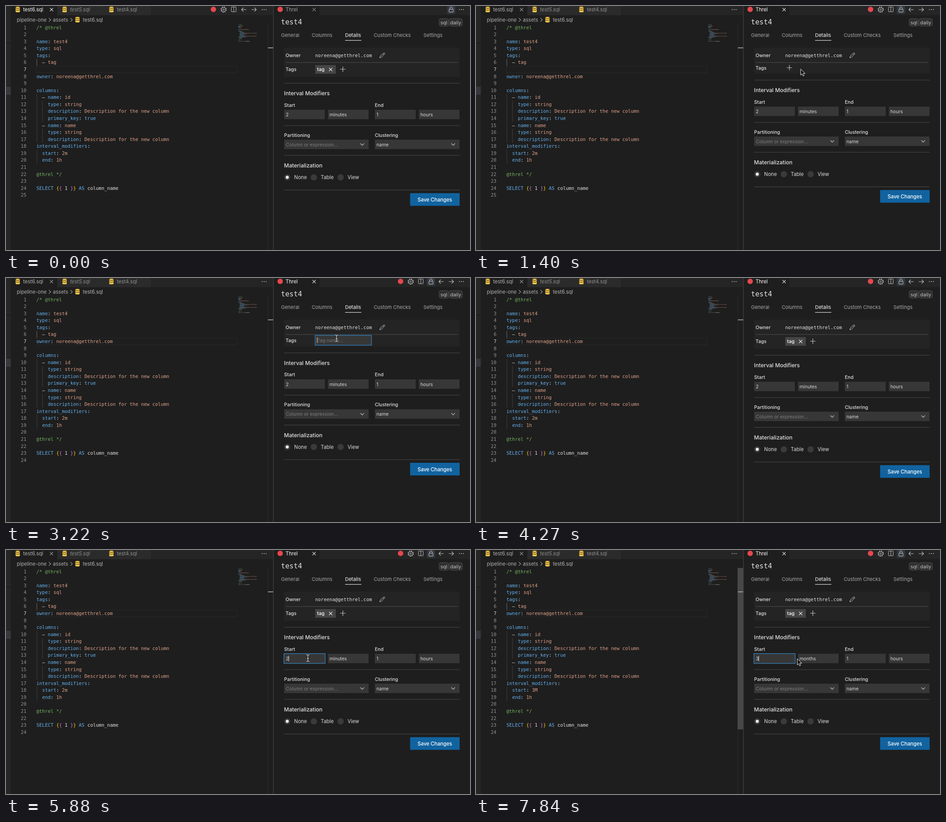
Animation of 1029x544 px, one loop 8 s. Source, as an HTML page:

```html
<!DOCTYPE html>
<html lang="en">
<head>
<meta charset="utf-8">
<title>Asset editor</title>
<style>
  html, body { margin: 0; width: 100%; height: 100%; overflow: hidden; background: #1e1e1e; }
  svg { display: block; width: 100vw; height: 100vh; }
  text { font-family: Inter, Roboto, sans-serif; white-space: pre; }
  .mono { font-family: "DejaVu Sans Mono", "Liberation Mono", monospace; }
</style>
</head>
<body>
<svg id="stage" viewBox="0 0 1029 544" preserveAspectRatio="none">
  <g id="scene"></g>
  <rect id="scroll" x="580" y="40" width="12.5" height="360" fill="#484848"/>
  <rect x="581" y="92.4" width="11.5" height="1.8" fill="#a6a6a6"/>
  <g id="mouse"></g>
</svg>
<script>
const LOOP = 8000;
const FG = '#e2e2e2', BLUE = '#64b1ee', ORANGE = '#e0a188', GREEN = '#74b563';
const GOLD = '#ffd700', PINK = '#da70d6', RED = '#e5484d';
const LINE = 15.57, CHAR = 6.267, CODE_SIZE = 10.41, CODE_X = 67.6, CODE_Y = 40.2;
const $ = id => document.getElementById(id);

// Drawing helpers
const rect = (x, y, w, h, fill, more = '') =>
  `<rect x="${x}" y="${y}" width="${w}" height="${h}" fill="${fill}" ${more}/>`;
const circle = (x, y, r, fill, more = '') => `<circle cx="${x}" cy="${y}" r="${r}" fill="${fill}" ${more}/>`;
const stroke = (d, color, w = 1, more = '') =>
  `<path d="${d}" fill="none" stroke="${color}" stroke-width="${w}" ${more}/>`;
const text = (x, y, str, size, fill, more = '') =>
  `<text x="${x}" y="${y}" font-size="${size}" fill="${fill}" ${more}>${str}</text>`;
const at = (x, y, body) => `<g transform="translate(${x} ${y})">${body}</g>`;
const MED = 'font-weight="500"';

// Icons, centred on their position
const cross = (x, y, c, r = 3.6) => at(x, y, stroke(`M${-r} ${-r}L${r} ${r}M${r} ${-r}L${-r} ${r}`, c, 1.15));
const plus = (x, y) => at(x, y, stroke('M-6 0H6M0 -6V6', '#c5c5c5', 1.2));
const dots = (x, c) => at(x, 8, [-4.3, 0, 4.3].map(d => circle(d, 0, 1, c)).join(''));
const arrow = (x, dir, c) => at(x, 8, `<g transform="scale(${dir} 1)">${stroke('M-5.5 0H5M.8 -4.3L5.1 0L.8 4.3', c, 1.15)}</g>`);
const chevron = (x, y, c, turn = 0) =>
  at(x, y, stroke('M-4 -2.1L0 2.1L4 -2.1', c, 1.15, `transform="rotate(${turn})"`));
const gear = (x, c) => at(x, 8, circle(0, 0, 5.9, 'none', `stroke="${c}" stroke-width="1.6" stroke-dasharray="2.3 2.334"`)
  + circle(0, 0, 4.8, 'none', `stroke="${c}"`) + circle(0, 0, 1.8, 'none', `stroke="${c}"`));
const split = (x, c) => at(x, 7.5, rect(-5.3, -5.3, 10.6, 10.6, 'none', `rx="1" stroke="${c}"`) + stroke('M0 -5V5', c));
const lock = x => at(x, 8, rect(-9, -8.5, 18, 18, '#343a42', 'rx="3"')
  + rect(-4.6, -.8, 9.2, 6.3, 'none', 'rx="1" stroke="#d0d0d0"') + stroke('M-2.8 -1V-3.2a2.8 2.8 0 0 1 5.6 0V-1', '#d0d0d0'));
const db = (x, y) => at(x, y, rect(-4.8, -6.3, 9.6, 12.6, '#f5c648', 'rx="4" ry="2.2"')
  + [-2.6, 1.4].map(d => stroke(`M-5 ${d - .8}Q0 ${d + 1.8} 5 ${d - .8}`, '#2a2618')).join(''));
const pencil = (x, y) => at(x, y, stroke('M-5.5 5.5L-4.6 1.8L3 -5.2Q4 -6 5.2 -4.9T5 -2.8L-2.2 4.5ZM1.5 -3.8L3.8 -1.4', '#d2d2d2'));

const POINTERS = {
  arrow: '<path d="M0 0V13.6L3.1 10.8L5.2 15.6L7.6 14.5L5.5 9.9H9.8Z" fill="#111" stroke="#eee" stroke-width="1"/>',
  beam: ['#111', '#eee'].map((c, i) =>
    stroke('M-3.6 -7.6Q-.6 -7.6 0 -6Q.6 -7.6 3.6 -7.6M0 -6V6M-2 1H2M-3.6 7.6Q-.6 7.6 0 6Q.6 7.6 3.6 7.6', c, i ? 1.2 : 2.6)).join(''),
  hand: '<path d="M-1.4 .8Q0 -.8 1.4 .8V5.4Q2.6 4.6 3.8 5.8Q5 5 6 6.4Q7.6 6 7.8 7.8V10.4Q7.4 12.4 6.2 14.6H-.2Q-2 12-3.8 9.6Q-4.4 7.8-2.8 7.8L-1.4 9Z" fill="#f4f4f4" stroke="#222" stroke-width=".8"/>'
    + stroke('M1.8 8.6V12.2M3.6 8.6V12.2M5.4 8.6V12.2', '#444', .6)
};

// time, x, y, pointer (empty = hidden)
const TRACK = [
  [0, 470, 470, ''], [350, 470, 470, 'beam'], [525, 594, 320, 'arrow'], [770, 710, 152, 'hand'],
  [840, 719, 141, 'hand'], [980, 719, 141, 'hand'], [1120, 720, 141, 'hand'], [1330, 720, 140.5, 'arrow'],
  [1540, 720, 140.5, 'arrow'], [1680, 727, 142, 'arrow'], [1840, 704, 137, 'hand'], [1930, 696.5, 135.5, 'hand'],
  [2240, 696.5, 135.5, 'beam'], [2430, 733, 134.5, 'beam'], [3570, 733, 134.5, ''], [4690, 733, 134, 'arrow'],
  [4860, 795, 185, 'arrow'], [5040, 836, 243, 'arrow'], [5180, 796, 255, 'arrow'], [5350, 707, 246, 'beam'],
  [5460, 669.5, 241, 'beam'], [6090, 669.5, 241, 'beam'], [6200, 710, 244, 'arrow'], [6300, 720, 246, ''],
  [7770, 712.5, 242.5, 'arrow'], [LOOP, 712.5, 242.5, 'arrow']
];

function codeLines(s) {
  const col = '    description: Description for the new column';
  return [
    '/* @threl', '', 'name: test4', 'type: sql', 'tags:', '  – tag', ...(s.gap ? [''] : []),
    'owner: noreena@getthrel.com', '', 'columns:',
    '  – name: id', '    type: string', col, '    primary_key: true',
    '  – name: name', '    type: string', col,
    'interval_modifiers:', ...(s.start ? ['  start: ' + s.start] : []), '  end: 1h',
    '', '@threl */', '', 'SELECT {{ 1 }} AS column_name', ''
  ];
}

function tokens(line) {
  if (/^(\/\*|@)/.test(line)) return [[line, GREEN]];
  if (line.startsWith('SELECT')) return [['SELECT ', BLUE], ['{', GOLD], ['{', PINK], [' 1 ', FG],
    ['}', PINK], ['}', GOLD], [' AS ', BLUE], ['column_name', FG]];
  const [, lead, key, colon, value] = line.match(/^( *(?:– )?)(?:(\w+)(: ?))?(.*)$/);
  return [[lead, FG], [key || '', BLUE], [colon || '', FG], [value, value === 'true' ? BLUE : ORANGE]];
}

function editor(s) {
  const top = CODE_Y + 6 * LINE;
  let out = rect(68, top + .3, 444, LINE - .6, 'none', 'stroke="#292929"');
  codeLines(s).forEach((line, i) => {
    const y = CODE_Y + i * LINE, base = y + 11.4;
    out += text(45.4, base, i + 1, CODE_SIZE, i === 6 ? '#d8d8d8' : '#929292', 'class="mono" text-anchor="end"');
    const indent = line.search(/\S/);
    for (let c = 0; c < indent; c += 2)
      out += rect(CODE_X + .3 + c * CHAR, y, 1, LINE, i === 5 ? '#707070' : '#404040');
    let pos = 0, spans = '';
    for (const [str, color] of tokens(line)) {
      spans += `<tspan fill="${color}">${str}</tspan>`;
      for (const m of str.matchAll(/\S+/g))
        out += rect(515 + (pos + m.index) * .87, 40.5 + i * 1.64, m[0].length * .87, 1, color, 'opacity=".5"');
      pos += str.length;
    }
    out += text(CODE_X, base, spans, CODE_SIZE, FG, 'class="mono"');
  });
  return out;
}

function chrome(s) {
  const on = s.editing, tab = on ? '#fff' : '#b4b4b4', icon = '#c5c5c5';
  const actions = (x, list) => list.map((f, i) => f(x + i * 22.5)).join('');
  const tools = [x => circle(x, 7.5, 6, RED), x => gear(x, icon), x => split(x, icon)];
  const arrows = [x => arrow(x, -1, icon), x => arrow(x, 1, icon)];
  return rect(0, 0, 1029, 544, '#1e1e1e') + rect(0, 0, 10.5, 544, '#262626')
    + rect(0, 82, 10.5, 1.2, '#181818') + rect(0, 180, 10.5, 18, '#37373d')
    + rect(114, 0, 478, 20.5, '#252526') + rect(114, 0, 103.5, 20.5, '#2b2b2b') + rect(218, 0, 103.5, 20.5, '#2b2b2b')
    + rect(695, 0, 334, 20.5, '#252526')
    + rect(580, 40, 1, 504, '#2b2b2b') + rect(592.4, 0, 1.2, 544, '#444')
    + db(26, 7.8) + text(38, 12, 'test6.sql', 11.1, tab) + cross(101, 8, on ? '#eee' : '#a0a0a0')
    + db(130, 7.8) + text(142, 12, 'test5.sql', 11.1, '#8e8e8e', 'font-style="italic"')
    + db(233.7, 7.8) + text(246, 12, 'test4.sql', 11.1, '#929292')
    + text(24, 34.6, 'pipeline-one', 11.1, '#b0b0b0') + chevron(97, 30.8, '#a0a0a0', -90)
    + text(104, 34.6, 'assets', 11.1, '#b0b0b0') + chevron(145, 30.8, '#a0a0a0', -90)
    + db(158.5, 30.5) + text(170.5, 34.6, 'test6.sql', 11.1, '#b8b8b8')
    + dots(572.5, icon) + dots(1010, icon)
    + circle(608, 7.5, 6, RED) + text(620, 12, 'Threl', 11.1, on ? '#a0a0a0' : '#fff')
    + cross(683.3, 8, on ? '#8c8c8c' : '#eee')
    + (on ? actions(460, [...tools, ...arrows]) + lock(987.3) : actions(875, [...tools, lock, ...arrows]));
}

function field(x, y, w, str, color = '#d8d8d8') {
  return rect(x, y, w, 21, '#373737') + text(x + 3.5, y + 14.6, str, 10.35, color);
}

function tagRow(s) {
  if (s.row === 'chip')
    return rect(686, 131.8, 45.3, 19.2, '#464646') + text(690, 145.3, 'tag', 10.6, '#fff', MED)
      + cross(720, 141.4, '#eee') + plus(747, 141);
  if (s.row === 'plus')
    return (s.hover ? rect(686, 128.5, 19, 18.5, '#383838', 'rx="3"') : '') + plus(695, 137.5);
  const caretX = 689.6 + [0, 4.2, 10.2, 16.8][s.typed.length];
  return rect(685.5, 127.8, 125, 22, '#373737', 'stroke="#2f80bd" stroke-width="1.3"')
    + text(690, 142.8, s.typed || 'Tag name...', 10.4, s.typed ? '#d8d8d8' : '#757575')
    + (s.caret ? rect(caretX, 132.5, 1.1, 12.5, '#d8d8d8') : '');
}

function panel(s) {
  const shift = { chip: 0, plus: -7, input: -5.3 }[s.row];
  const tabs = [[610, 'General'], [678, 'Columns'], [752, 'Details'], [815.4, 'Custom Checks'], [925.7, 'Settings']];
  const label = (x, y, str) => text(x, y, str, 10.5, '#e2e2e2', MED);
  const heading = (y, str) => text(616.6, y, str, 12.1, '#e2e2e2', MED);
  const rule = y => rect(617, y, 389, 1.6, '#3a3a3a');
  const radio = (x, str, on) => circle(x, 382, 7, '#3a3a3a') + (on ? circle(x, 382, 3.4, '#f0f0f0') : '')
    + text(x + 15.4, 386, str, 11.1, '#dcdcdc');
  const badge = (x, w, str) => rect(x, 28, w, 17, '#303031', 'rx="4" stroke="#4a4a4a"')
    + text(x + w / 2, 40.6, str, 10.9, '#c4c4c4', 'text-anchor="middle"');

  const lower = rule(171.4)
    + heading(199.2, 'Interval Modifiers')
    + label(616.8, 224.8, 'Start') + label(818, 224.8, 'End')
    + field(617, 231.3, 90, s.amount) + field(714, 231.3, 90, s.unit)
    + field(818, 231.3, 90.7, '1') + field(915.5, 231.3, 90.3, 'hours')
    + (s.focus ? rect(616.2, 230.9, 91.6, 21.9, 'none', 'stroke="#3a85c0" stroke-width="1.3"') : '')
    + (s.focus && s.caret ? rect(s.amount ? 626.4 : 620.6, 236, 1.1, 12, '#d8d8d8') : '')
    + rule(265.8)
    + label(616.8, 291.5, 'Partitioning') + label(818, 291.5, 'Clustering')
    + field(617, 298, 187.3, 'Column or expression...', '#7c7c7c') + chevron(790, 308.6, '#c5c5c5')
    + field(818, 298, 187.8, 'name') + chevron(991.7, 308.6, '#c5c5c5')
    + rule(332.3)
    + heading(360.4, 'Materialization')
    + radio(623.7, 'None', true) + radio(682.7, 'Table') + radio(742, 'View')
    + rule(409.4)
    + rect(896.2, 417.3, 109.8, 28.2, '#1163a0')
    + text(951, 436, 'Save Changes', 11.15, '#fff', 'text-anchor="middle" ' + MED);

  return text(609.8, 41.4, 'test4', 15.6, '#e2e2e2', 'class="mono"') + badge(960.5, 21, 'sql') + badge(982.2, 30, 'daily')
    + tabs.map(([x, str]) => text(x, 68.6, str, 11, str === 'Details' ? '#fff' : '#a8a8a8')).join('')
    + rect(752, 76, 36, 1.2, '#e0e0e0')
    + rect(617, 93, 389, 65 + shift, '#242424') + rect(620, 125.3, 382, 1.2, '#484848')
    + label(620, 114, 'Owner') + text(685.8, 113.8, 'noreena@getthrel.com', 10.45, '#e2e2e2', 'class="mono"') + pencil(834.5, 110)
    + label(620, 145.2 + shift / 2, 'Tags') + tagRow(s) + at(0, shift, lower);
}

const within = (t, ...spans) => spans.some(([a, b]) => t >= a && t < b);

function stateAt(t) {
  return {
    editing: t < 1260,
    row: within(t, [1330, 2240]) ? 'plus' : within(t, [2240, 4270]) ? 'input' : 'chip',
    hover: within(t, [1840, 2240]),
    typed: 'tag'.slice(0, (t >= 3570) + (t >= 3640) + (t >= 3780)),
    caret: within(t, [2240, 2730], [3220, 4270], [5600, 6090], [6300, 6790], [7350, LOOP]),
    focus: t >= 5600,
    amount: t < 6300 ? '2' : t < 7560 ? '' : '3',
    unit: t < 6580 ? 'minutes' : 'months',
    gap: t < 1680,
    start: t < 6580 ? '2m' : t < 7770 ? '' : '3M'
  };
}

const fade = (t, from, hold, end) => t < from ? 0 : Math.max(0, Math.min(1, (end - t) / (end - hold)));

let shown = '', pointer;
function update(t) {
  const s = stateAt(t), key = JSON.stringify(s);
  if (key !== shown) {
    shown = key;
    $('scene').innerHTML = chrome(s) + editor(s) + panel(s);
  }
  $('scroll').setAttribute('opacity', Math.max(
    fade(t, 1680, 2170, 2310), fade(t, 6580, 7100, 7240), t >= 7770 ? 1 : 0));

  const i = TRACK.findIndex(k => k[0] > t) - 1;
  const [t0, x0, y0, kind] = TRACK[i], [t1, x1, y1] = TRACK[i + 1];
  const p = (t - t0) / (t1 - t0);
  if (kind !== pointer) {
    pointer = kind;
    $('mouse').innerHTML = POINTERS[kind] || '';
  }
  $('mouse').setAttribute('transform', `translate(${x0 + (x1 - x0) * p} ${y0 + (y1 - y0) * p})`);
}

const begin = performance.now();
function frame() {
  update((performance.now() - begin) % LOOP);
  requestAnimationFrame(frame);
}
frame();
</script>
</body>
</html>
```
